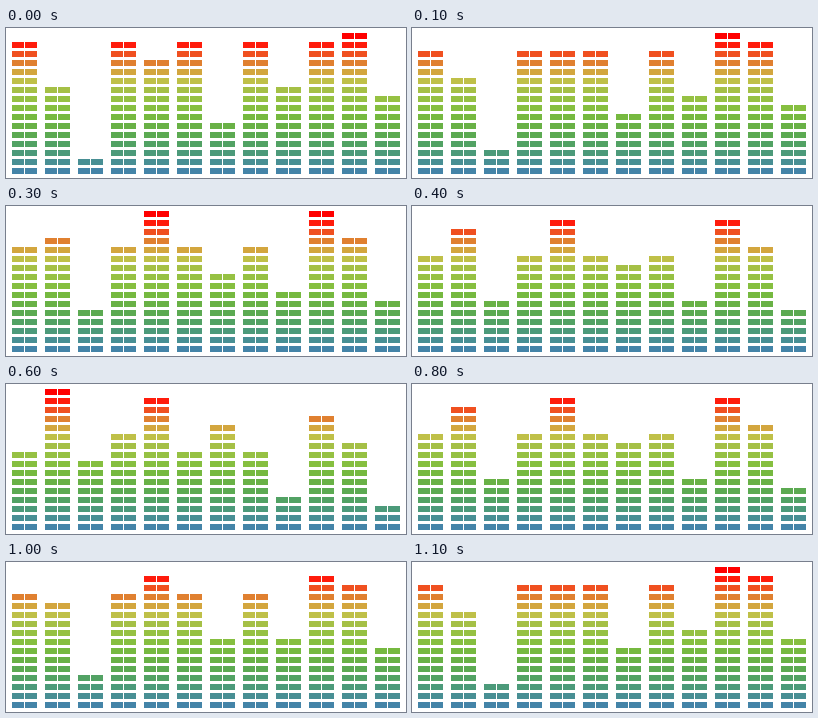
Animation of 400x150 px, one loop 1200 ms. Source, as an HTML page:

```html
<!DOCTYPE html>
<html lang="en">
<head>
<meta charset="utf-8">
<title>Equalizer</title>
<style>
  html, body { margin: 0; width: 100%; height: 100%; overflow: hidden; background: #fff; }
  svg { display: block; }
</style>
</head>
<body>
<svg id="stage" width="400" height="150" viewBox="0 0 400 150" shape-rendering="crispEdges"></svg>
<script>
const STEP_MS = 100, LAST_STEP = 6;
const UP = '++++++', DOWN = '------';

// Each bar: starting level, then one move per step
const bars = [
  [15, DOWN], [10, UP], [2, UP], [15, '-----+'], [13, '+++--+'], [15, DOWN],
  [6, UP], [15, DOWN], [10, DOWN], [15, '+-+---'], [16, DOWN], [9, DOWN]
];

// Row colours, bottom to top
const colors = [
  '#4484a8', '#488f94', '#4c9a7a', '#52a264', '#5caa52', '#69b146', '#76b940', '#86bf40',
  '#96c143', '#a5c046', '#bfc048', '#d3a63e', '#e08030', '#f05020', '#ff1c0c', '#ff0000'
];

const stage = document.getElementById('stage');
const columns = bars.map((_, i) => colors.map((fill, row) => {
  const x = 6 + 33 * i, y = 140 - 9 * row;
  const cell = document.createElementNS(stage.namespaceURI, 'path');
  cell.setAttribute('d', `M${x} ${y}h12v6h-12zM${x + 13} ${y}h12v6h-12z`);
  cell.setAttribute('fill', fill);
  return stage.appendChild(cell);
}));

function level([start, moves], step) {
  return [...moves.slice(0, step)].reduce((sum, m) => sum + (m === '+' ? 1 : -1), start);
}

function render(time) {
  // The levels run forward, then back
  const tick = Math.floor(time / STEP_MS) % (2 * LAST_STEP);
  const step = LAST_STEP - Math.abs(LAST_STEP - tick);
  columns.forEach((cells, i) => {
    const lit = level(bars[i], step);
    cells.forEach((cell, row) => cell.setAttribute('visibility', row < lit ? 'visible' : 'hidden'));
  });
}

const startTime = performance.now();
function frame() {
  render(performance.now() - startTime);
  requestAnimationFrame(frame);
}
frame();
</script>
</body>
</html>
```
